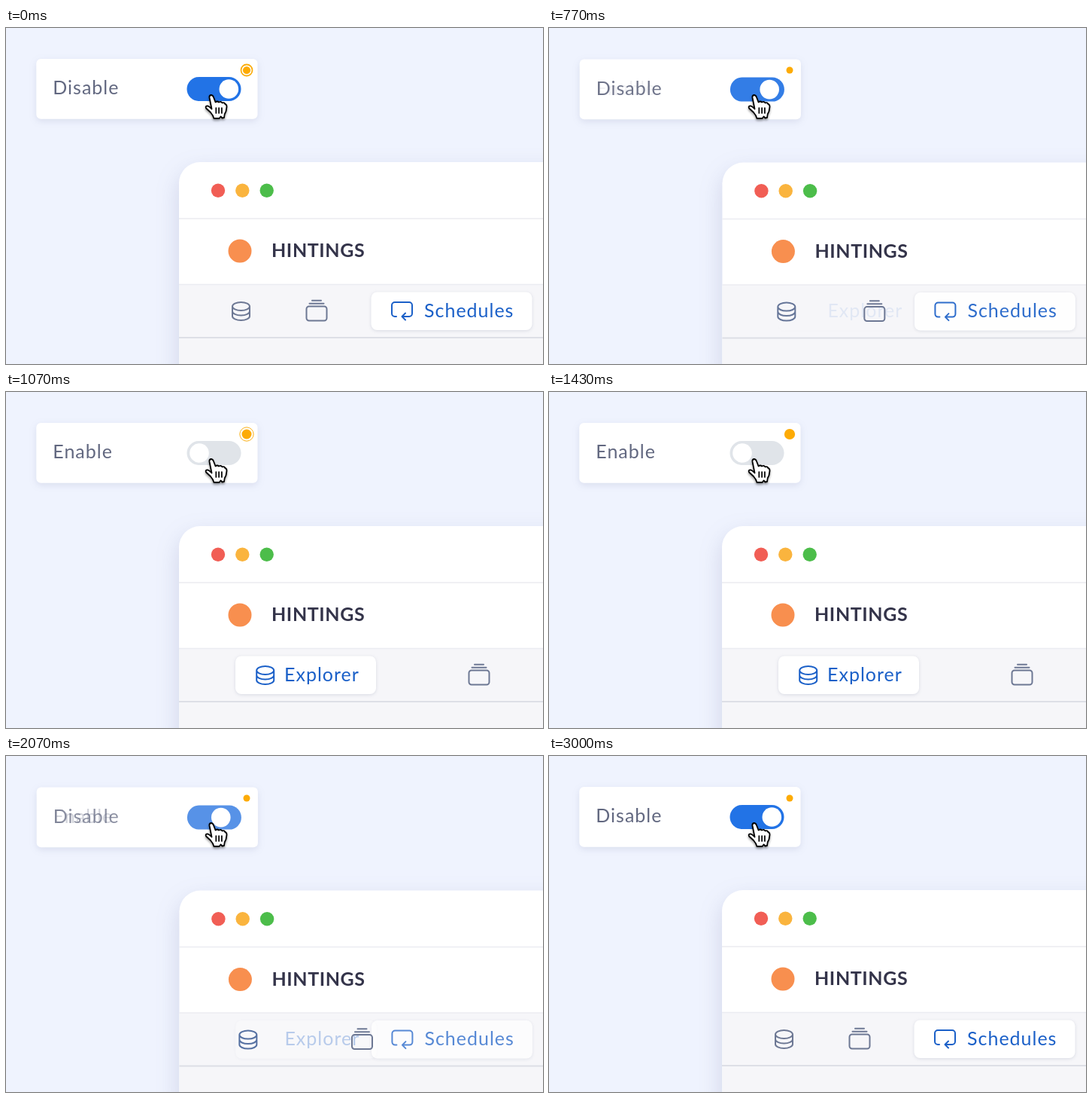
An HTML page for the animation above (3.22 s loop, 714x446 px).

```html
<!DOCTYPE html>
<html lang="en">
<head>
<meta charset="utf-8">
<title>Toggle and tabs</title>
<style>
html, body { margin: 0; width: 100%; height: 100%; overflow: hidden; background: #eff3fe; }
svg { display: block; width: 714px; height: 446px; }
text { font: 25px Lato, "Open Sans", sans-serif; letter-spacing: 1px; }
.label { fill: #626880; }
.title { font-weight: 700; fill: #34344a; letter-spacing: .6px; }
.icon { fill: none; stroke-width: 2; stroke-linecap: round; stroke-linejoin: round; }
.soft { filter: drop-shadow(0 3px 5px rgba(75, 85, 130, .13)); }
.deep { filter: drop-shadow(0 12px 15px rgba(85, 90, 145, .2)); }
.pill { fill: #fff; filter: drop-shadow(0 1px 2px rgba(50, 60, 100, .15)); }
.hand { filter: drop-shadow(0 2px 1.5px rgba(0, 0, 0, .4)); }
</style>
</head>
<body>
<svg viewBox="0 0 714 446">
  <g id="scene">
    <rect class="soft" x="40.300" y="41" width="294.200" height="79.700" rx="6" fill="#fff"/>
    <text class="label" id="disable" x="62.300" y="88.300">Disable</text>
    <text class="label" id="enable" x="62.300" y="88.300">Enable</text>
    <rect id="track" x="240.500" y="65" width="72" height="32" rx="16"/>
    <circle id="knob" cy="81" r="12.800" fill="#fff"/>

    <path class="deep" d="M230 460V206a28 28 0 0 1 28-28H760V460z" fill="#fff"/>
    <path d="M230 341H760V460H230z" fill="#f6f6f9"/>
    <path d="M230 253H760M230 340.500H760" stroke="#ebecf1" stroke-width="1.500"/>
    <path d="M230 411H760" stroke="#dddfe6" stroke-width="2"/>
    <circle cx="282" cy="215.700" r="9.200" fill="#f15e55"/>
    <circle cx="314.300" cy="215.700" r="9.200" fill="#fab43e"/>
    <circle cx="346.700" cy="215.700" r="9.200" fill="#4cbd4a"/>
    <circle cx="311" cy="296" r="15.500" fill="#f88f4f"/>
    <text class="title" x="353" y="304">HINTINGS</text>

    <g id="explorer">
      <rect class="pill" x="305" y="350.500" width="187" height="50.500" rx="8"/>
      <text x="370" y="383.500" fill="#1b60c8">Explorer</text>
    </g>
    <g id="schedules">
      <rect class="pill" x="485.500" y="350.500" width="214" height="50.500" rx="8"/>
      <path class="icon" stroke="#1b60c8" d="M519 383h-2a4 4 0 0 1-4-4v-11a4 4 0 0 1 4-4h19a4 4 0 0 1 4 4v11a4 4 0 0 1-4 4h-9m4-4.500-4.500 4.500 4.500 4.500"/>
      <text x="556" y="383.500" fill="#1b60c8">Schedules</text>
    </g>
    <path class="icon" id="disks" d="M-11.500-6.500a11.500 5.500 0 0 1 23 0a11.500 5.500 0 0 1-23 0V6.500a11.500 5.500 0 0 0 23 0V-6.500M-11.500 0a11.500 5.500 0 0 0 23 0"/>
    <path class="icon" id="stack" stroke="#6d7894" d="M-10-6.500h20a3.500 3.500 0 0 1 3.500 3.500v12a3.500 3.500 0 0 1-3.500 3.500h-20a3.500 3.500 0 0 1-3.500-3.500v-12a3.500 3.500 0 0 1 3.500-3.500zM-9.500-10.300h19M-6-14.300h12"/>
  </g>

  <circle id="ring" cx="320" cy="56" fill="none" stroke="#faad0d"/>
  <circle id="dot" cx="320" cy="56" fill="#fdab05"/>

  <g class="hand" transform="translate(-.5 0)" stroke="#000" stroke-linecap="round" stroke-linejoin="round">
    <path fill="#fff" stroke-width="1.800" d="M271 92.500Q270.500 89.500 273 89Q275.500 89 276.500 92L279 98.500Q281.500 96.500 283.500 98.500Q286.500 97 288 99.500Q291 98.500 291.800 101Q294 101.500 294 104.500L293 110.500Q290.500 114.500 290.500 119L288 119.500L286 117.500L284 120H277Q276 116 272.500 112L266.500 106.500Q265.300 103.700 267.800 103.300Q270.500 103.500 274 107.500Z"/>
    <path fill="none" stroke-width="1.700" d="M279.800 106v7M283.600 106v7M287.400 106v7"/>
  </g>
</svg>
<script>
const LOOP = 3220, MOVE = 400, TURN_OFF = 612, TURN_ON = 1833;
const PULSE = 660, SWELL = 140;
const $ = id => document.getElementById(id);
const clamp = x => Math.min(1, Math.max(0, x));
const mix = (a, b, p) => a + (b - a) * p;
const smooth = x => (x = clamp(x), x * x * (3 - 2 * x));
const blend = (a, b, p) => `rgb(${a.map((v, i) => Math.round(mix(v, b[i], p)))})`;

// Cubic Bezier (.7, -.4, .4, 1.4): pulls back first, then overshoots
function backEase(x) {
  if (x <= 0 || x >= 1) return clamp(x);
  const curve = (a, b, s) => 3 * (1 - s) * s * ((1 - s) * a + s * b) + s ** 3;
  let lo = 0, hi = 1;
  for (let i = 0; i < 24; i++) {
    const mid = (lo + hi) / 2;
    if (curve(.7, .4, mid) < x) lo = mid; else hi = mid;
  }
  return curve(-.4, 1.4, lo);
}

function drawPulse(t) {
  const age = t < TURN_OFF + MOVE ? 30 + Math.max(0, t - 70)
    : t < TURN_ON ? t - TURN_OFF - MOVE
    : t - 2300;
  const on = age >= 0 && age < PULSE;
  const size = on ? smooth(age / SWELL) * (1 - smooth((age - 180) / (PULSE - 180))) : 0;
  const grow = clamp(age / 65);
  $('dot').setAttribute('r', mix(4.5, 9.700, size));
  $('ring').setAttribute('r', mix(5.800, 9.500, grow));
  $('ring').setAttribute('stroke-width', mix(2.600, .8, grow));
  $('ring').style.opacity = on && age < SWELL ? 1 : 0;
}

function draw(t) {
  const off = backEase((t - TURN_OFF) / MOVE) - backEase((t - TURN_ON) / MOVE);
  const moving = [TURN_OFF, TURN_ON].some(s => t > s && t < s + MOVE);
  const show = (id, v) => $(id).style.opacity = clamp(v);
  const place = (id, x) => $(id).setAttribute('transform', `translate(${x} 376)`);

  $('scene').setAttribute('transform', moving ? 'translate(.4 .6)' : '');
  show('disable', 1 - off);
  show('enable', off);
  show('schedules', 1 - off);
  show('explorer', off);
  $('track').setAttribute('fill', blend([34, 115, 230], [224, 228, 233], off));
  $('knob').setAttribute('cx', mix(296.300, 257, off));
  place('disks', mix(312.500, 344.700, off));
  place('stack', mix(413, 629, off));
  $('disks').setAttribute('stroke', blend([109, 120, 148], [27, 96, 200], off));
  drawPulse(t);
}

const start = performance.now();
function tick() {
  draw((performance.now() - start) % LOOP);
  requestAnimationFrame(tick);
}
tick();
</script>
</body>
</html>
```
